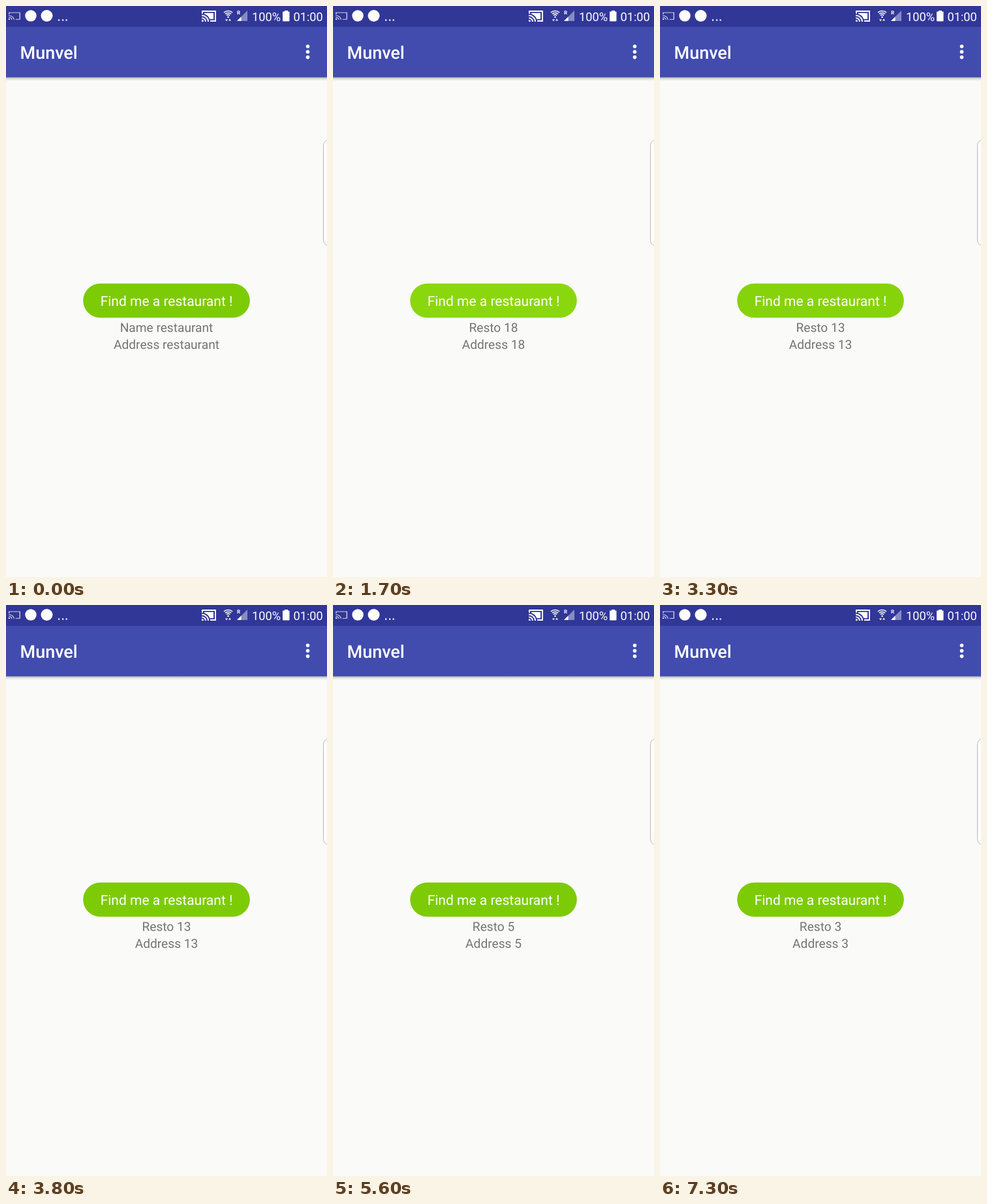
An HTML page with a canvas that plays this animation: 492x876 px, repeating every 8000 ms.

```html
<!DOCTYPE html>
<html lang="en">
<head>
<meta charset="utf-8">
<title>Restaurant finder</title>
<style>
  html, body { margin: 0; width: 100%; height: 100%; overflow: hidden; background: #fafaf8; }
  canvas { display: block; }
</style>
</head>
<body>
<canvas id="stage" width="492" height="876"></canvas>
<script>
const ctx = document.getElementById('stage').getContext('2d');
const LOOP = 8000, STEP = 100;
const BASE = [125, 203, 6], PRESSED = [139, 215, 14];

// Unhinted glyph positions, so that long labels do not drift.
ctx.textRendering = 'geometricPrecision';

// Each tap lights the button from start to end; the result appears at reveal.
const taps = [
  { start: 1500, end: 2200, reveal: 1600, id: 18 },
  { start: 3200, end: 3800, reveal: 3300, id: 13 },
  { start: 4900, end: 5600, reveal: 4900, id: 5 },
  { start: 6900, end: 7300, reveal: 6900, id: 3 }
];

function rect(x, y, w, h, color) {
  ctx.fillStyle = color;
  ctx.fillRect(x, y, w, h);
}

function disc(x, y, r, color = '#fff') {
  ctx.fillStyle = color;
  ctx.beginPath();
  ctx.arc(x, y, r, 0, Math.PI * 2);
  ctx.fill();
}

function rounded(x, y, w, h, r, color) {
  ctx.fillStyle = color;
  ctx.beginPath();
  ctx.roundRect(x, y, w, h, r);
  ctx.fill();
}

function poly(points, color = '#fff') {
  ctx.fillStyle = color;
  ctx.beginPath();
  points.forEach(([x, y]) => ctx.lineTo(x, y));
  ctx.closePath();
  ctx.fill();
}

function line(points, width) {
  ctx.strokeStyle = '#fff';
  ctx.lineWidth = width;
  ctx.beginPath();
  points.forEach(([x, y]) => ctx.lineTo(x, y));
  ctx.stroke();
}

function arc(x, y, r, from, to, width) {
  ctx.strokeStyle = '#fff';
  ctx.lineWidth = width;
  ctx.beginPath();
  ctx.arc(x, y, r, from * Math.PI, to * Math.PI);
  ctx.stroke();
}

function label(text, x, y, size, color, align = 'center', weight = 400) {
  ctx.font = `${weight} ${size}px Roboto, sans-serif`;
  ctx.textAlign = align;
  ctx.fillStyle = color;
  ctx.fillText(text, x, y);
}

// Screen outline, 22 by 18 units, with waves leaving its open lower left corner.
function castIcon(x, y, w, h, weight, filled) {
  ctx.save();
  ctx.translate(x, y);
  ctx.scale(w / 22, h / 18);
  line([[1, 5], [1, 1], [21, 1], [21, 17], [13, 17]], weight);
  [6, 10].forEach(r => arc(0, 18, r, 1.5, 2, weight));
  arc(0, 18, 1.5, 1.5, 2, 3);
  if (filled) {
    const edge = Math.atan2(4, 12.4);
    ctx.fillStyle = '#fff';
    ctx.beginPath();
    ctx.moveTo(18, 4);
    ctx.lineTo(4, 4);
    ctx.arc(0, 18, 13, edge - Math.PI / 2, -edge);
    ctx.lineTo(18, 14);
    ctx.fill();
  }
  ctx.restore();
}

function wifiIcon(x, y) {
  [10, 7, 4].forEach(r => arc(x, y, r, 1.27, 1.73, 1.6));
  disc(x, y - 0.5, 1.3);
  poly([[x - 4.5, y + 3], [x - 0.5, y + 3], [x - 2.5, y + 6]]);
  poly([[x + 0.5, y + 5], [x + 4.5, y + 5], [x + 2.5, y + 2]]);
}

function statusBar() {
  rect(0, 0, 492, 32, '#313797');
  castIcon(4, 9.5, 18, 11.5, 1.3, false);
  disc(38, 15, 8.7);
  disc(62.5, 15, 9);
  [81, 87, 92.5].forEach(x => rect(x - 1, 20.5, 2.2, 2.2, '#fff'));

  castIcon(300, 7, 22, 17, 2, true);
  wifiIcon(340.5, 17.5);
  poly([[370, 7], [370, 23], [354, 23]], 'rgba(255,255,255,.42)');
  poly([[360.5, 16.5], [360.5, 23], [354, 23]]);
  label('R', 356.5, 13, 8, '#fff', 'center', 700);

  label('100%', 377, 22.5, 18.2, '#fff', 'left');
  rect(427, 7, 5, 2, '#fff');
  rounded(424, 8.5, 10.5, 15, 1, '#fff');
  label('01:00', 440.5, 22.5, 18.2, '#fff', 'left');
}

function toolbar() {
  const shadow = ctx.createLinearGradient(0, 109, 0, 115);
  shadow.addColorStop(0, 'rgba(0,0,0,.36)');
  shadow.addColorStop(0.4, 'rgba(0,0,0,.12)');
  shadow.addColorStop(1, 'rgba(0,0,0,0)');
  rect(0, 109, 492, 6, shadow);
  rect(0, 32, 492, 77.3, '#414cae');
  label('Munvel', 21.5, 81, 27, '#fff', 'left', 500);
  [62, 70.3, 78.6].forEach(y => disc(462.5, y, 2.8));
}

function edgeHandle() {
  rounded(486.5, 205.5, 30, 162, 8, '#fdfdfc');
  ctx.strokeStyle = '#b8b8b8';
  ctx.lineWidth = 1;
  ctx.stroke();
}

function glow(t) {
  const tap = taps.find(({ start, end }) => t >= start && t < end);
  return tap ? Math.min(1, (t - tap.start + STEP) / 300, (tap.end - t) / 400) : 0;
}

function button(strength) {
  const color = BASE.map((c, i) => Math.round(c + (PRESSED[i] - c) * strength));
  rounded(118.2, 425.7, 255.6, 52.5, 26.25, `rgb(${color})`);
  label('Find me a restaurant !', 246, 460, 21, '#fff');
}

function result(t) {
  const shown = taps.filter(tap => t >= tap.reveal).pop();
  const [name, address] = shown
    ? [`Resto ${shown.id}`, `Address ${shown.id}`]
    : ['Name restaurant', 'Address restaurant'];
  label(name, 246, 500, 19.15, '#747473');
  label(address, 246, 526, 19.15, '#747473');
}

function draw(now) {
  const t = Math.floor((now % LOOP) / STEP) * STEP;
  rect(0, 0, 492, 876, '#fafaf8');
  statusBar();
  toolbar();
  edgeHandle();
  button(glow(t));
  result(t);
}

const began = performance.now();
function tick() {
  draw(performance.now() - began);
  requestAnimationFrame(tick);
}
tick();
</script>
</body>
</html>
```
